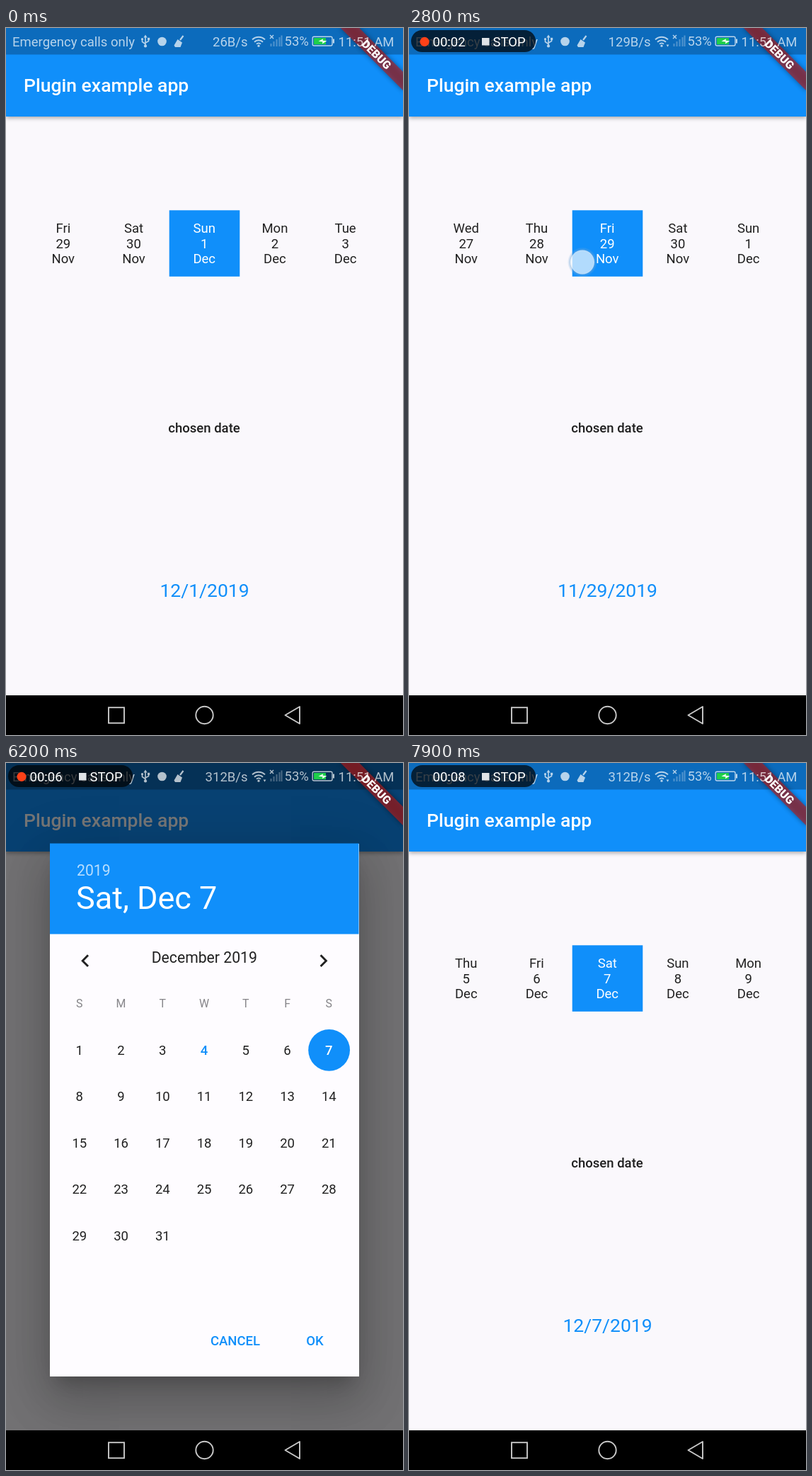
These frames come from a looping animation (561x998 px, 8000 ms). An HTML page:

```html
<!DOCTYPE html>
<html lang="en">
<head>
<meta charset="utf-8">
<title>Date picker demo</title>
<style>
  html, body { margin: 0; width: 100%; height: 100%; overflow: hidden; background: #faf8fc; }
  svg { position: absolute; left: 0; top: 0; width: 561px; height: 998px; overflow: hidden; }
  text { font-family: Roboto, "Noto Sans", sans-serif; font-size: 18.5px; white-space: pre; }
  .mid { text-anchor: middle; }
  .med { font-weight: 500; }
  #modal { position: absolute; left: 0; top: 0; width: 561px; height: 942px; overflow: hidden; }
  #shade { position: absolute; inset: 0; background: rgba(0,0,0,.54); }
  #card {
    position: absolute; left: 62px; top: 113.5px; width: 436.5px; height: 752px; background: #fefcff;
    box-shadow: 0 17px 23px -11px rgba(0,0,0,.2), 0 37px 59px 5px rgba(0,0,0,.14), 0 14px 72px 12px rgba(0,0,0,.12);
  }
  #bar {
    position: absolute; left: 0; top: 0; width: 561px; height: 125px; background: #108ffa;
    box-shadow: 0 2px 6px rgba(0,0,0,.34);
  }
</style>
</head>
<body>
<div id="bar"></div>
<svg id="app" viewBox="0 0 561 998">
  <clipPath id="strip"><rect x="31" y="257" width="499" height="94"/></clipPath>
  <rect width="561" height="37.5" fill="#000" opacity=".25"/>
  <text class="med" x="25" y="90.3" fill="#fff" style="font-size:26.5px">Plugin example app</text>
  <rect x="230.7" y="257.3" width="99.6" height="93.5" fill="#108ffa"/>
  <g id="days" clip-path="url(#strip)"></g>
  <text class="mid med" x="280" y="570.6" fill="#1f1f1f">chosen date</text>
  <text id="chosen" class="mid" x="280.5" y="803" fill="#108ffa" style="font-size:26.5px"></text>
</svg>

<div id="modal">
  <div id="shade"></div>
  <div id="card"></div>
  <svg id="dialog" viewBox="0 0 561 998">
    <rect x="62" y="113.5" width="436.5" height="128" fill="#108ffa"/>
    <text x="100" y="159" fill="#fff" fill-opacity=".7" style="font-size:21.2px">2019</text>
    <text id="head" x="99" y="206.3" fill="#fff" style="font-size:45px"></text>
    <text class="mid" x="280.3" y="282.3" fill="#212121" style="font-size:21.2px">December 2019</text>
    <path d="M116 271.3 108.2 279.2 116 287.1M444.6 271.3 452.4 279.2 444.6 287.1" fill="none" stroke="#212121" stroke-width="2.9"/>
    <circle id="pick" r="29.4" cy="405.3" fill="#108ffa"/>
    <g id="grid"></g>
    <rect id="press" x="387" y="788" width="99" height="56" rx="3" fill="#108ffa" opacity=".045"/>
    <text class="mid med" x="324" y="822" fill="#108ffa">CANCEL</text>
    <text class="mid med" x="436.5" y="822" fill="#108ffa">OK</text>
  </svg>
</div>

<svg viewBox="0 0 561 998">
  <defs>
    <filter id="soft" x="-20%" y="-60%" width="140%" height="220%"><feGaussianBlur stdDeviation="3.5"/></filter>
    <radialGradient id="halo">
      <stop offset=".7" stop-color="#6fa6d8" stop-opacity="0"/>
      <stop offset=".82" stop-color="#6fa6d8" stop-opacity=".5"/>
      <stop offset="1" stop-color="#6fa6d8" stop-opacity="0"/>
    </radialGradient>
  </defs>

  <g transform="translate(561 0) rotate(45)">
    <rect x="-62.3" y="43.6" width="124.6" height="18.7" fill="#000" opacity=".4" filter="url(#soft)"/>
    <rect x="-64" y="43.6" width="128" height="18.7" fill="#b71c1c" opacity=".63"/>
    <text class="mid" y="58.6" fill="#fff" style="font-size:15.9px;font-weight:900">DEBUG</text>
  </g>

  <g fill="#fff" opacity=".7">
    <text x="9" y="26">Emergency calls only</text>
    <text id="speed" x="341.5" y="26" text-anchor="end"></text>
    <text x="393.5" y="25.2">53%</text>
    <text x="469.5" y="26">11:51 AM</text>
    <path d="M197 12V25M192.5 16V19.5L197 22.5M201.5 15.5V18.5L197 21" fill="none" stroke="#fff" stroke-width="1.6"/>
    <path d="M197 9.5 199.6 13.6H194.4Z"/>
    <circle cx="197" cy="25.4" r="2.1"/><circle cx="192.5" cy="15.7" r="1.6"/>
    <rect x="200" y="13.8" width="3.2" height="3.2"/>
    <circle cx="220.5" cy="19" r="6.3"/>
    <path d="M250.5 11 246 17" stroke="#fff" stroke-width="2.2"/>
    <path d="M242.5 16 249 20.5 246.5 27H239L237.5 24.5Z"/>
    <g fill="none" stroke="#fff" stroke-width="2">
      <path d="M348 16.4A12.8 12.8 0 0 1 366 16.4M351 19.7A8.5 8.5 0 0 1 363 19.7M354 22.6A4.3 4.3 0 0 1 360 22.6"/>
    </g>
    <circle cx="357" cy="25.2" r="1.6"/>
    <path id="flow" d="M363.6 23.5H367.4L365.5 26.8Z"/>
    <path d="M373 10 378 15M378 10 373 15" stroke="#fff" stroke-width="1.4"/>
    <path d="M374.5 26V22M378.5 26V19M382.5 26V16M386.5 26V13M389.5 26V10.5" stroke="#fff" stroke-width="2" opacity=".4"/>
  </g>
  <rect x="433.2" y="12.2" width="27.8" height="12.8" rx="2" fill="none" stroke="#fff" stroke-opacity=".72" stroke-width="1.4"/>
  <rect x="462" y="15.5" width="2" height="6" fill="#fff" opacity=".72"/>
  <rect x="435" y="14" width="17" height="9.2" fill="#1fcf4b"/>
  <path d="M441.5 18.7 448.2 15.2 447.4 17.8 453.5 18.2 446.8 22.2 447.6 19.5Z" fill="#fff"/>

  <g id="pill">
    <rect x="3" y="3" width="176" height="31" rx="15.5" fill="#000" opacity=".7"/>
    <circle id="dot" cx="22" cy="19.3" r="6.6" fill="#fe4118"/>
    <text id="clock" x="33.5" y="26" fill="#fff"></text>
    <rect x="103" y="14" width="10.5" height="10.5" fill="#dfe3e7"/>
    <text x="118.5" y="26" fill="#fff">STOP</text>
  </g>

  <rect y="942" width="561" height="56" fill="#000"/>
  <g fill="none" stroke="#c9c9c9" stroke-width="1.9">
    <rect x="145" y="959.2" width="22" height="22"/>
    <circle cx="280.5" cy="970" r="12.2"/>
    <path d="M394.5 970 415 958V982Z" stroke-linejoin="round"/>
  </g>

  <g id="touch">
    <circle r="21" fill="url(#halo)"/>
    <circle r="17" fill="#fff" opacity=".68"/>
  </g>
</svg>

<script>
const LOOP = 8000, STEP = 100;
const PITCH = 99.7, MID = 280.2;
const WEEK = ['Sun', 'Mon', 'Tue', 'Wed', 'Thu', 'Fri', 'Sat'];
const $ = id => document.getElementById(id);

// [time, days from Dec 1]
const scroll = [[1000, 0], [1300, 1.8], [1500, 2], [1700, 2], [2200, -1.7], [2500, -2],
                [2800, -2], [3200, -.3], [3600, 0], [7500, 0], [7800, 6]];
const fade = [[4500, 0], [4700, 1], [7500, 1], [7700, 0]];
const speeds = [[0, '26B/s'], [2400, '129B/s'], [5500, '312B/s']];
const ticks = [[0, 0], [1200, 1], [2100, 2], [3000, 3], [3900, 4], [4800, 5], [5800, 6], [6800, 7], [7800, 8]];
const dots = [[0, 1], [1500, 0], [2100, 1], [3300, 0], [4300, 1], [5300, 0], [5800, 1], [6300, 0], [6800, 1], [7800, 0]];
// [down, move from, move to, up, x0, y0, x1, y1]
const touches = [
  [900, 1000, 1300, 1300, 443, 270.5, 243, 285],
  [1600, 1700, 2200, 2200, 90, 312, 460, 305],
  [2700, 2800, 3200, 3200, 245, 330.5, 75, 322],
  [4200, 4200, 4400, 4400, 281, 304, 281, 304],
  [5600, 5600, 5900, 5900, 457, 408, 457, 408],
  [7200, 7200, 7400, 7400, 448, 824, 448, 824]
];

const clamp = v => Math.max(0, Math.min(1, v));
const ease = v => v * v * (3 - 2 * v);
const at = (table, t) => table.filter(r => r[0] <= t).pop()[1];

function tween(table, t) {
  if (t <= table[0][0]) return table[0][1];
  for (let i = 1; i < table.length; i++) {
    const [t0, a] = table[i - 1], [t1, b] = table[i];
    if (t < t1) return a + (b - a) * ease((t - t0) / (t1 - t0));
  }
  return table[table.length - 1][1];
}

function label(parent, x, y, str, fill, cls = 'mid') {
  const el = document.createElementNS('http://www.w3.org/2000/svg', 'text');
  el.setAttribute('x', x);
  el.setAttribute('y', y);
  el.setAttribute('class', cls);
  el.setAttribute('fill', fill);
  el.textContent = str;
  parent.append(el);
  return el;
}

const columns = Array.from({length: 7}, () => [288.7, 310.5, 332.3].map(y => label($('days'), 0, y, '', '#212121')));

const colX = c => 103.8 + 58.75 * c;
[...'SMTWTFS'].forEach((d, c) => {
  label($('grid'), colX(c), 344.8, d, '#868589').style.fontSize = '15.9px';
});
const cells = Array.from({length: 31}, (_, i) =>
  label($('grid'), colX(i % 7), 411.7 + 65.5 * Math.floor(i / 7), i + 1, '#212121'));

function drawStrip(pos) {
  const near = Math.round(pos);
  columns.forEach((col, i) => {
    const k = near + i - 3;
    const d = new Date(Date.UTC(2019, 11, 1 + k));
    const parts = [WEEK[d.getUTCDay()], d.getUTCDate(), d.getUTCMonth() === 10 ? 'Nov' : 'Dec'];
    col.forEach((el, n) => {
      el.textContent = parts[n];
      el.setAttribute('x', MID + (k - pos) * PITCH);
      el.setAttribute('fill', k === near ? '#fff' : '#212121');
    });
    if (k === near) $('chosen').textContent = `${d.getUTCMonth() + 1}/${d.getUTCDate()}/2019`;
  });
}

function drawDialog(t) {
  const show = tween(fade, t), day = t < 5900 ? 1 : 7;
  $('modal').style.opacity = show;
  $('modal').style.display = show ? '' : 'none';
  $('head').textContent = `${WEEK[day - 1]}, Dec ${day}`;
  $('pick').setAttribute('cx', colX(day - 1) + .3);
  $('press').style.display = t >= 7200 ? '' : 'none';
  cells.forEach((el, i) => {
    const on = i + 1 === day, today = i === 3;
    el.setAttribute('fill', on ? '#fff' : today ? '#108ffa' : '#212121');
    el.style.fontWeight = on || today ? 500 : 400;
  });
}

function drawTouch(t) {
  const hit = touches.find(r => t >= r[0] && t < r[3] + 200);
  $('touch').style.display = hit ? '' : 'none';
  if (!hit) return;
  const [, from, to, up, x0, y0, x1, y1] = hit;
  const p = ease(clamp((t - from) / (to - from)));
  $('touch').setAttribute('transform', `translate(${x0 + (x1 - x0) * p} ${y0 + (y1 - y0) * p})`);
  $('touch').style.opacity = 1 - clamp((t - up) / 200);
}

function draw(t) {
  drawStrip(tween(scroll, t));
  drawDialog(t);
  drawTouch(t);
  $('speed').textContent = at(speeds, t);
  $('flow').style.display = t >= 2400 ? '' : 'none';
  $('pill').style.display = t >= 100 ? '' : 'none';
  $('clock').textContent = '00:0' + at(ticks, t);
  $('dot').style.display = at(dots, t) ? '' : 'none';
}

const start = performance.now();
function frame(now) {
  const t = Math.max(0, now - start) % LOOP;
  draw(Math.floor(t / STEP) * STEP);
  requestAnimationFrame(frame);
}
draw(0);
requestAnimationFrame(frame);
</script>
</body>
</html>
```
